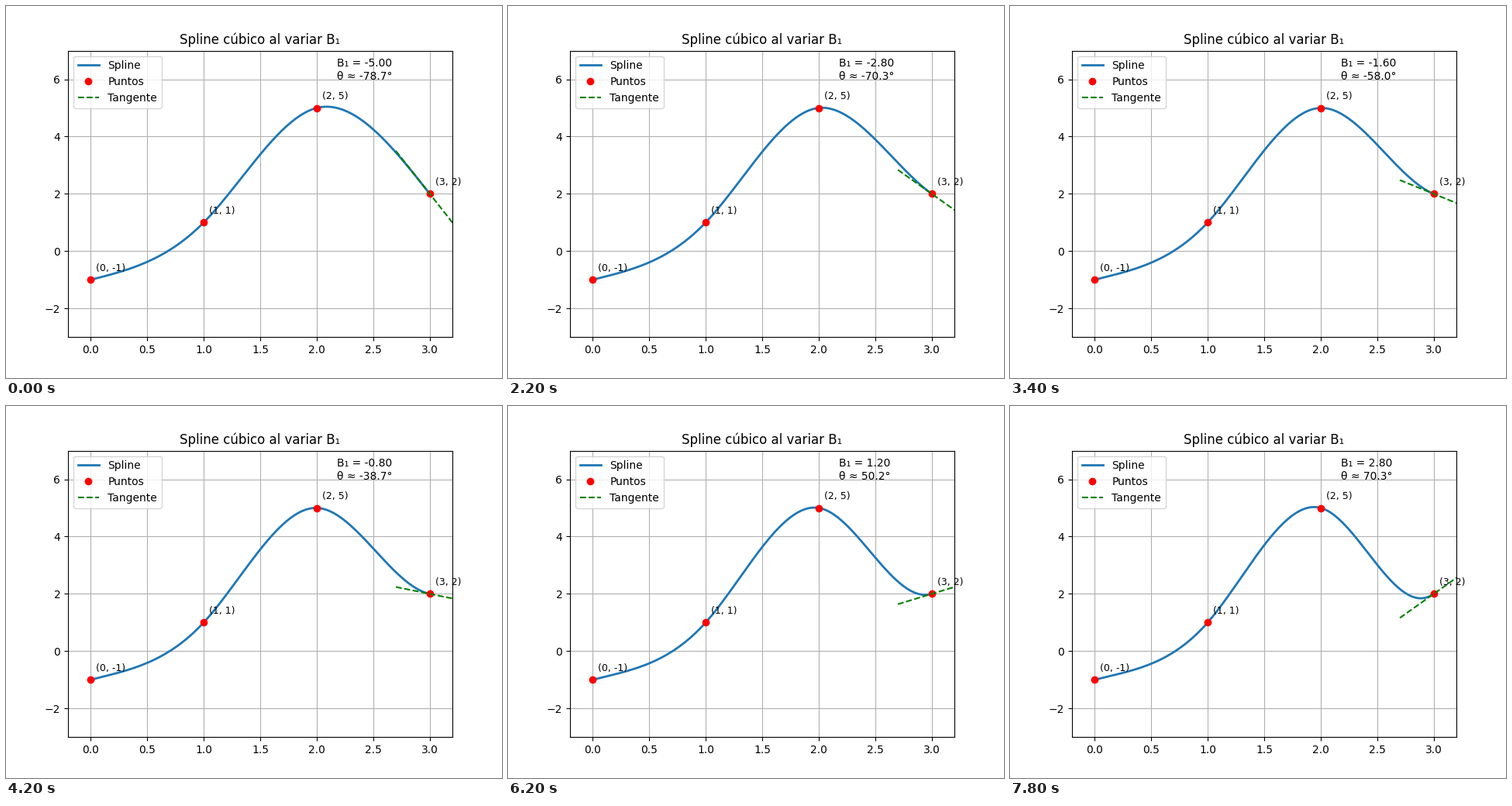
Animation, 640 px wide and 480 px high, one loop 8000 ms. Source, as a matplotlib script:

```python
import numpy as np
import matplotlib.pyplot as plt
from matplotlib.animation import FuncAnimation

FRAMES, INTERVAL = 40, 200
XS = np.array([0, 1, 2, 3])
YS = np.array([-1, 1, 5, 2])
START_SLOPE = 1.0


def knot_slopes(end_slope):
    """Slopes of the clamped cubic spline at the unit-spaced knots."""
    rhs = 3.0 * (YS[2:] - YS[:-2])
    rhs[0] -= START_SLOPE
    rhs[-1] -= end_slope
    inner = np.linalg.solve([[4, 1], [1, 4]], rhs)
    return np.array([START_SLOPE, *inner, end_slope])


def spline(x, end_slope):
    m = knot_slopes(end_slope)
    i = np.clip(x.astype(int), 0, len(XS) - 2)
    t = x - XS[i]
    s = 1 - t
    return (s * s * (1 + 2 * t) * YS[i] + t * t * (3 - 2 * t) * YS[i + 1]
            + t * s * s * m[i] - t * t * s * m[i + 1])


fig, ax = plt.subplots(figsize=(6.4, 4.8), dpi=100)
ax.set_xlim(-0.2, 3.2)
ax.set_ylim(-3, 7)
ax.set_title("Spline cúbico al variar B₁")
ax.grid(True)

grid_x = np.linspace(0, 3, 300)
tangent_x = np.linspace(2.7, 3.3, 10)

curve, = ax.plot([], [], lw=2, label="Spline")
ax.plot(XS, YS, "ro", label="Puntos")
tangent, = ax.plot([], [], "g--", lw=1.5, label="Tangente")
info = ax.text(0.7, 0.9, "", transform=ax.transAxes, fontsize=10)
for x, y in zip(XS, YS):
    ax.text(x + 0.05, y + 0.3, f"({x}, {y})", fontsize=9)
ax.legend(loc="upper left")


def update(frame):
    slope = (frame - 25) / 5
    angle = np.degrees(np.arctan(slope))
    curve.set_data(grid_x, spline(grid_x, slope))
    tangent.set_data(tangent_x, YS[-1] + slope * (tangent_x - XS[-1]))
    info.set_text(f"B₁ = {slope:.2f}\nθ ≈ {angle:.1f}°")
    return curve, tangent, info


anim = FuncAnimation(fig, update, frames=FRAMES, interval=INTERVAL,
                     init_func=lambda: update(0), repeat=True, repeat_delay=0)
plt.show()
```
